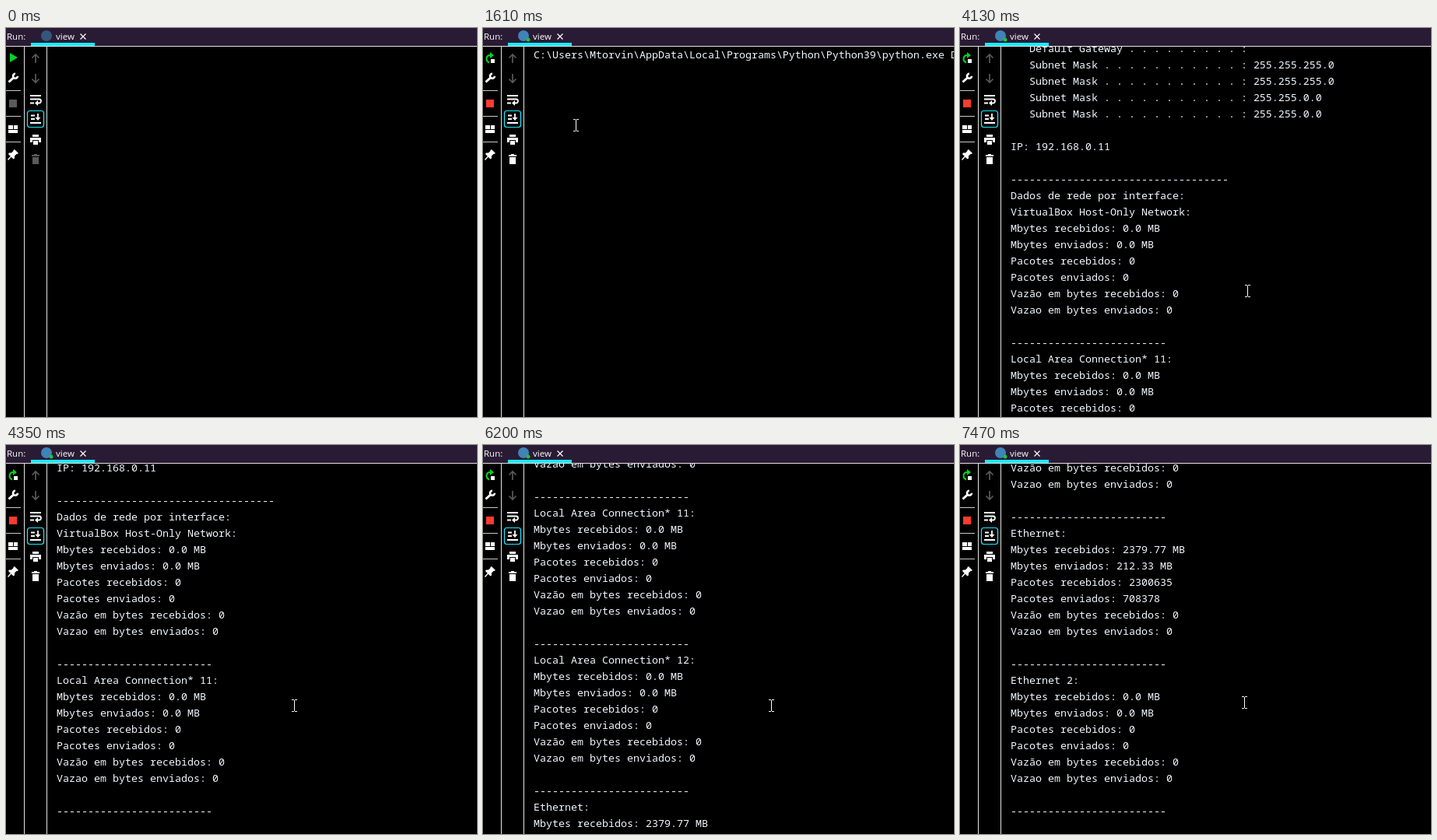
These frames come from a looping animation (605 by 500 pixels, 8 s). An HTML page with a canvas:

```html
<!DOCTYPE html>
<html lang="pt">
<head>
<meta charset="utf-8">
<title>Run: view</title>
<style>
  html, body { margin: 0; width: 100%; height: 100%; overflow: hidden; background: #000; }
  canvas { display: block; }
</style>
</head>
<body>
<canvas id="stage" width="605" height="500"></canvas>
<script>
const ctx = document.getElementById('stage').getContext('2d');
const LOOP = 8000, ROW = 21, RUN_AT = 1330;
const WHITE = '#fff', GRAY = '#5a5a5a', GREEN = '#00d420', CYAN = '#1aebff', RULE = '#e4e4e4';

// Console output
const gateway = (ip = '') => '   Default Gateway' + ' .'.repeat(9) + ' : ' + ip;
const mask = ip => '   Subnet Mask' + ' .'.repeat(11) + ' : ' + ip;
const report = (name, mbIn = '0.0', mbOut = '0.0', packIn = 0, packOut = 0) => [
  name + ':',
  `Mbytes recebidos: ${mbIn} MB`,
  `Mbytes enviados: ${mbOut} MB`,
  `Pacotes recebidos: ${packIn}`,
  `Pacotes enviados: ${packOut}`,
  'Vazão em bytes recebidos: 0',
  'Vazao em bytes enviados: 0',
  '',
  '-'.repeat(25)
];
const lines = [
  'C:\\Users\\Mtorvin\\AppData\\Local\\Programs\\Python\\Python39\\python.exe D:/',
  'Dados da rede:',
  gateway(), gateway('fe80::be2e:48ff:fed3:db97%10'), gateway(), gateway(),
  mask('255.255.255.0'), mask('255.255.255.0'), mask('255.255.0.0'), mask('255.255.0.0'),
  '', 'IP: 192.168.0.11', '', '-'.repeat(35),
  'Dados de rede por interface:',
  ...report('VirtualBox Host-Only Network'),
  ...report('Local Area Connection* 11'),
  ...report('Local Area Connection* 12'),
  ...report('Ethernet', '2379.77', '212.33', 2300635, 708378),
  ...report('Ethernet 2')
];

// [time, printed lines, pixels the scroll still lags behind]
const prints = [
  [0, 0], [1540, 1], [1820, 6], [1840, 15], [3000, 20], [3070, 24],
  [4130, 28, 18], [4240, 31, 17], [4350, 33],
  [5210, 34, 16], [5270, 38, 16], [5340, 42],
  [6200, 44, 16], [6270, 48, 16], [6340, 51],
  [7210, 52, 16], [7300, 55, 16], [7390, 58, 16], [7470, 60]
];

// [time, x, y] of the mouse pointer
const pointer = [
  [160, 525, 478], [420, 380, 330], [700, 110, 130], [880, 34, 60], [980, 34, 60],
  [1130, 9, 38], [RUN_AT, 9, 38], [1610, 119, 125], [1720, 245, 243], [2570, 245, 243],
  [2940, 360, 337], [3780, 360, 337], [3880, 369, 338], [4200, 369, 338],
  [4240, 370, 335], [6700, 370, 335], [6810, 365, 331], [LOOP, 365, 331]
];

function rect(color, x, y, w, h) {
  ctx.fillStyle = color;
  ctx.fillRect(x, y, w, h);
}
function fill(color, path) {
  ctx.fillStyle = color;
  ctx.fill(new Path2D(path));
}
function stroke(color, width, path) {
  ctx.strokeStyle = color;
  ctx.lineWidth = width;
  ctx.stroke(new Path2D(path));
}
function disc(color, x, y, r) {
  ctx.fillStyle = color;
  ctx.beginPath();
  ctx.arc(x, y, r, 0, 2 * Math.PI);
  ctx.fill();
}

function drawConsole(t) {
  const [, count, lag = 0] = prints.findLast(p => p[0] <= t);
  const scroll = Math.max(0, ROW * count - 457 - lag);
  ctx.save();
  ctx.beginPath();
  ctx.rect(53, 24, 552, 476);
  ctx.clip();
  ctx.font = '13.333px "Noto Sans Mono", "DejaVu Sans Mono", monospace';
  ctx.fillStyle = '#f2f8ff';
  lines.slice(0, count).forEach((line, i) => ctx.fillText(line, 65, 39 + ROW * i - scroll));
  ctx.restore();
}

function drawHeader(running) {
  rect('#2a1b35', 0, 0, 605, 23);
  rect(RULE, 0, 23, 605, 1);
  rect(CYAN, 32, 19, 82, 4);
  ctx.font = '11.5px "Open Sans", "Noto Sans", sans-serif';
  ctx.fillStyle = WHITE;
  ctx.fillText('Run:', 1, 15);
  ctx.fillText('view', 64, 15);
  stroke(WHITE, 1.2, 'M95.5 7.5l7 7m0-7l-7 7');
  disc(running ? '#3f83b8' : '#31587c', 52, 10, 7);
  if (running) disc('#22c03c', 58, 15, 2.5);
}

function drawToolbars(running) {
  rect(RULE, 23, 24, 1, 476);
  rect(RULE, 52, 24, 1, 476);
  for (const y of [80, 113, 146]) rect('#c8c8c8', 0, y, 19, 1);

  // run / rerun, wrench, stop, layout, pin
  if (running) {
    stroke(GREEN, 2, 'M8 44.5A5 5 0 0 1 8 35h2');
    fill(GREEN, 'M9 31l5 4-5 4z');
    rect(WHITE, 10, 40, 5, 5);
  } else {
    fill(GREEN, 'M5 32l10 6-10 6z');
  }
  stroke(WHITE, 3, 'M3.5 69.5l6.5-6');
  stroke(WHITE, 2.6, 'M12 58.8a3 3 0 1 0 3 3');
  rect(running ? '#ff3b30' : GRAY, 4, 92, 10, 10);
  rect(WHITE, 3, 125, 6, 5);
  rect(WHITE, 10, 125, 5, 5);
  rect(WHITE, 3, 131, 12, 4);
  fill(WHITE, 'M11 156l5 5-1.5 1h-1l-2.5 2.5v3l-1.5 1-6.5-6.5 1-1.5h3l2.5-2.5v-1z');
  stroke(WHITE, 1.4, 'M6.5 165l-4 4.5');

  // up, down, soft wrap, scroll to end, print, clear
  stroke(GRAY, 1.7, 'M38 45V34m-4.5 4.5L38 34l4.5 4.5');
  stroke(GRAY, 1.7, 'M38 59v11m-4.5-4.5L38 70l4.5-4.5');
  stroke(WHITE, 1.8, 'M31 87h14M31 91.5h11.5a2.5 2.5 0 0 1 0 5H39M31 96.5h5');
  fill(WHITE, 'M41 93v7l-4-3.5z');
  ctx.strokeStyle = CYAN;
  ctx.lineWidth = 1.2;
  ctx.beginPath();
  ctx.roundRect(27.5, 106.5, 21, 21, 3);
  ctx.stroke();
  stroke(WHITE, 1.8, 'M32 112.5h5M32 117h5M31 122h14M41 110v7');
  fill(WHITE, 'M37.5 115h7l-3.5 4z');
  rect(WHITE, 34, 137, 8, 3);
  rect(WHITE, 31, 141, 14, 6);
  rect('#000', 34, 144, 8, 6);
  rect(WHITE, 35, 145, 6, 5);
  const bin = running ? WHITE : GRAY;
  rect(bin, 36, 162, 4, 1);
  rect(bin, 33, 163, 10, 2);
  rect(bin, 34, 166, 8, 9);
}

function drawPointer(t) {
  const now = t - t % 70;
  if (t < 160) return;
  const i = Math.max(1, pointer.findIndex(p => p[0] > now));
  const [t0, x0, y0] = pointer[i - 1], [t1, x1, y1] = pointer[i];
  const k = Math.max(0, (now - t0) / (t1 - t0));
  const x = Math.round(x0 + (x1 - x0) * k), y = Math.round(y0 + (y1 - y0) * k);
  ctx.save();
  ctx.translate(x, y);
  if (x < 53) {
    const arrow = 'M0 0v16l4-4 2.5 6 2.5-1-2.5-5.5h5z';
    fill(WHITE, arrow);
    stroke('#000', 1, arrow);
  } else {
    stroke(WHITE, 1, 'M.5-7v14M-3-7.5h3m1 0h3M-3 7.5h3m1 0h3');
  }
  ctx.restore();
}

function frame(now) {
  const t = now % LOOP, running = t >= RUN_AT;
  rect('#000', 0, 0, 605, 500);
  drawConsole(t);
  drawHeader(running);
  drawToolbars(running);
  drawPointer(t);
  requestAnimationFrame(frame);
}
requestAnimationFrame(frame);
</script>
</body>
</html>
```
